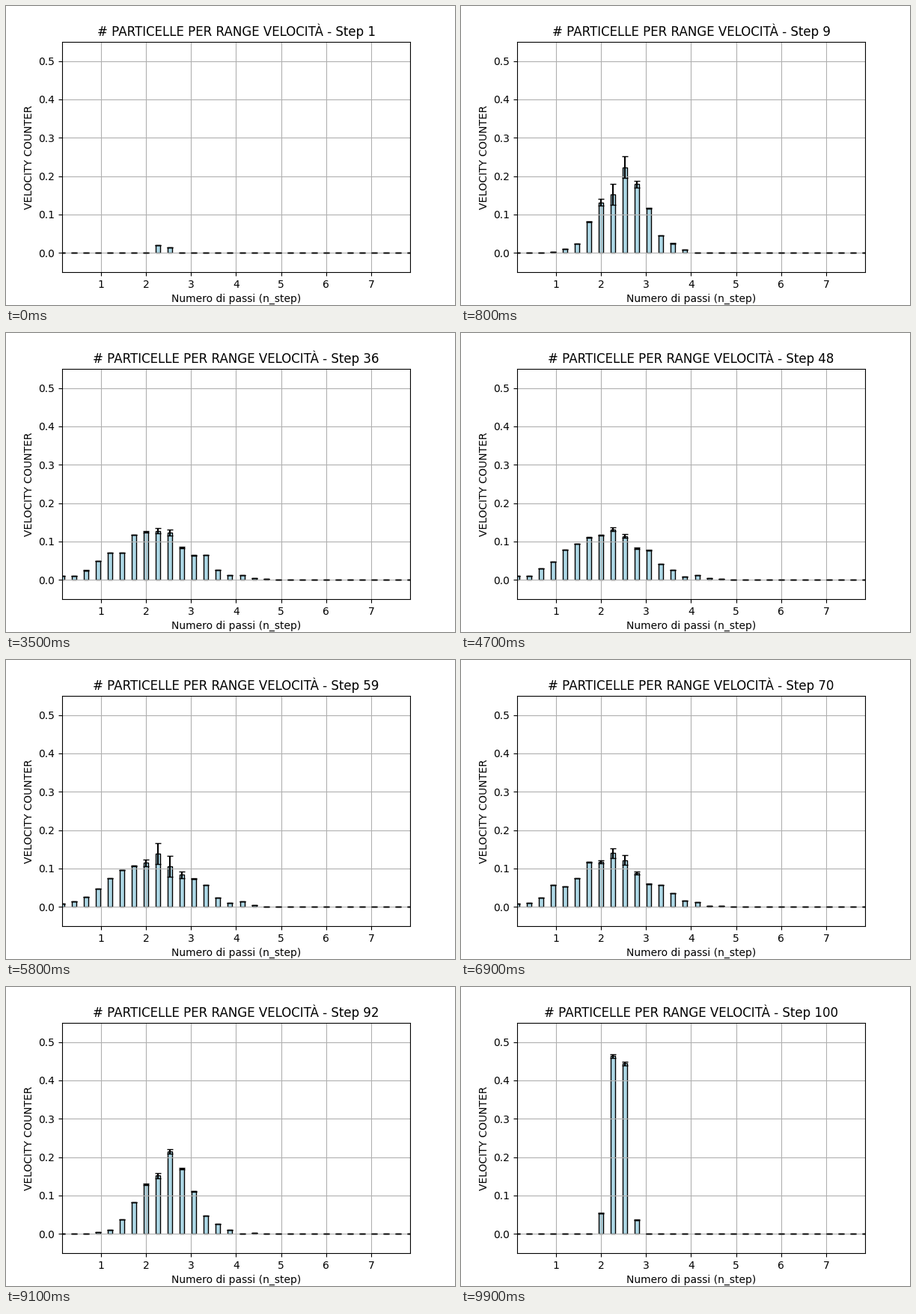
A matplotlib script that plays this animation: 600 by 400 pixels, repeating every 10000 ms.

```python
import numpy as np
import matplotlib.pyplot as plt
from matplotlib.animation import FuncAnimation

STEPS = 100
HALF = STEPS // 2
BINS = 30
WIDTH = 0.26667
EDGES = np.arange(BINS + 1) * WIDTH
CENTERS = EDGES[:-1] + WIDTH / 2
N = 1200

# Each particle drifts slowly between two normal scores
rng = np.random.default_rng(11)
scores = rng.normal(size=(2, N))
scores -= scores.mean(axis=1, keepdims=True)
scores /= scores.std(axis=1, keepdims=True)
rate = rng.uniform(0.01, 0.06, N)


def speeds(t):
    """Particle speeds: nearly equal at first, then spread by collisions."""
    mean = np.interp(t, [1, 9, 24, 50], [2.37, 2.5, 2.23, 2.1])
    spread = np.interp(t, [1, 9, 20, 50], [0.11, 0.52, 0.86, 0.82])
    angle = rate * (t - 1)
    z = scores[0] * np.cos(angle) + scores[1] * np.sin(angle)
    return np.abs(mean + spread * z)


def state(step):
    """Bar heights and error sizes; the motion reverses halfway."""
    t = min(step, STEPS + 2 - step)
    heights = np.histogram(speeds(t), EDGES)[0] / N
    if step == 1:
        return heights / BINS, np.zeros(BINS)
    n = (step - 1) % HALF + 1
    return heights, 0.29 * np.exp(-((CENTERS - 2.4) / 0.35) ** 2) / n


fig, ax = plt.subplots(figsize=(6, 4), dpi=100)
zeros = np.zeros(BINS)
bars = ax.bar(CENTERS, zeros, width=0.1, yerr=zeros, capsize=3,
              color="lightblue", edgecolor="black", ecolor="black")
_, caps, (stems,) = bars.errorbar.lines
ax.set_xlim(CENTERS[0], CENTERS[-1])
ax.set_ylim(-0.05, 0.55)
ax.set_xlabel("Numero di passi (n_step)")
ax.set_ylabel("VELOCITY COUNTER")
ax.grid(True)
title = ax.set_title("")


def update(i):
    h, err = state(i + 1)
    for bar, y in zip(bars, h):
        bar.set_height(y)
    caps[0].set_ydata(h - err)
    caps[1].set_ydata(h + err)
    stems.set_segments([[(x, y - e), (x, y + e)]
                        for x, y, e in zip(CENTERS, h, err)])
    title.set_text(f"# PARTICELLE PER RANGE VELOCITÀ - Step {i + 1}")
    return [*bars, *caps, stems, title]


anim = FuncAnimation(fig, update, frames=STEPS, interval=100, repeat=True,
                     repeat_delay=0, blit=False)
plt.show()
```
